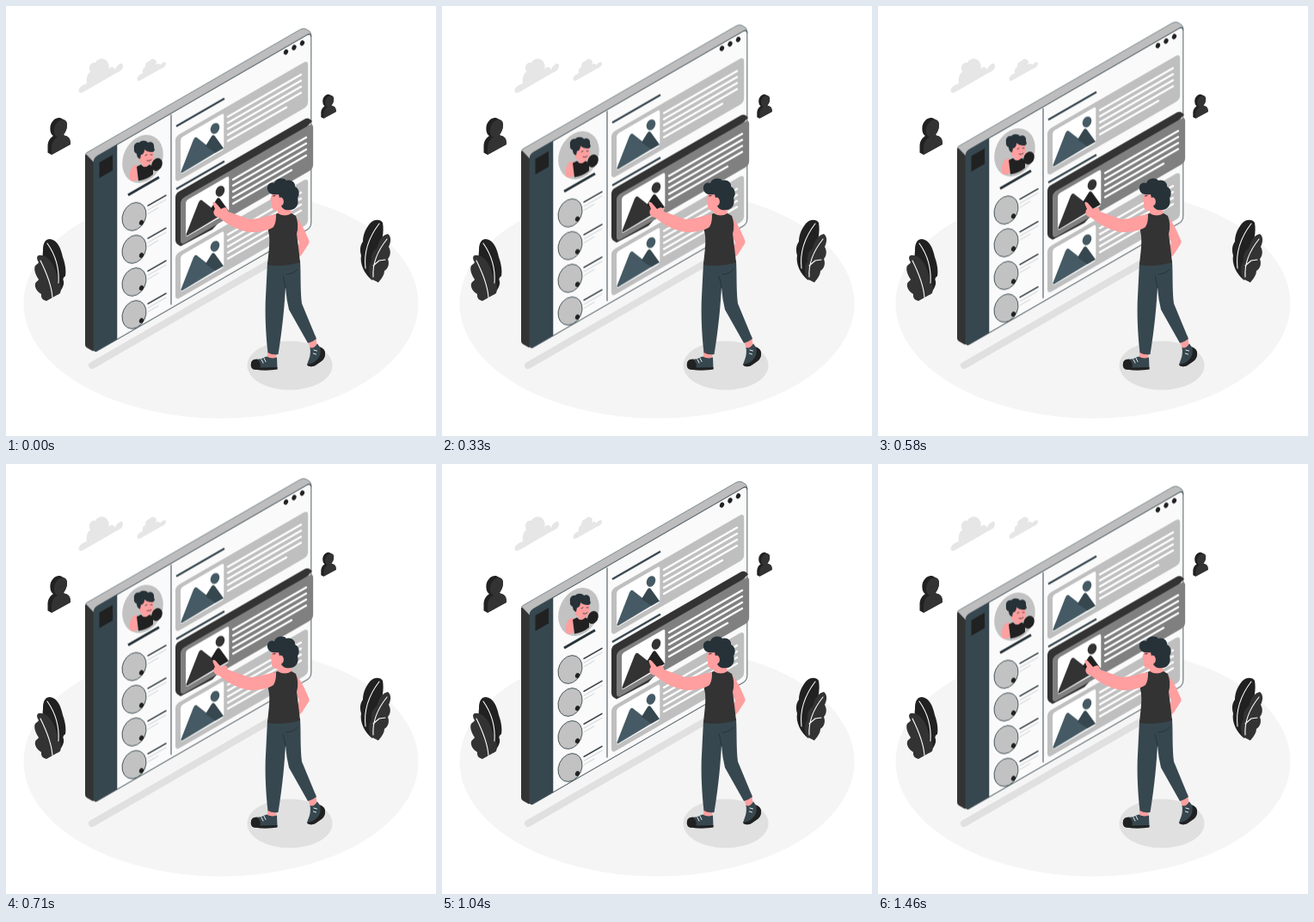
Recreate the animation shown at these times as an HTML page. Size 500 by 500 pixels, loop 1.5 s.

```html
<!DOCTYPE html>
<html lang="en">
<head>
<meta charset="utf-8">
<title>Dashboard</title>
<style>
  html, body { margin: 0; width: 100%; height: 100%; overflow: hidden; background: #fff; }
  svg { display: block; width: 100vw; height: 100vh; }
  #screen { animation: float 1.5s linear infinite; }
  @keyframes float { 50% { transform: translateY(-10px); } }
  .card { color: #bfbfbf; --ink: #455a64; --shade: #37474f; }
  .card.active { color: #808080; --ink: #333; --shade: #212121; }
  .ink { fill: var(--ink); }
  .shade { fill: var(--shade); }
  .line { fill: none; stroke-linecap: round; stroke-linejoin: round; }
  .slate { fill: #37474f; }
  .navy { fill: #263238; }
  .black { fill: #212121; }
  .side { fill: #333; }
  .skin { fill: #ff9f9f; }
</style>
</head>
<body>
<svg viewBox="0 0 500 500">
  <defs>
    <g id="card">
      <rect width="178" height="53.500" rx="5" fill="currentColor" transform="matrix(.866 -.5 0 1 197 152)"/>
      <rect x="7" y="5" width="58" height="42.500" rx="3" fill="#fff" transform="matrix(.866 -.5 0 1 197 152)"/>
      <path class="ink" d="M203.500 192.500L217.800 156Q220 150.500 223 154L244 170.500 205 194Q203 195 203.500 192.500Z"/>
      <path class="shade" d="M232 163L238.500 152.500Q241 148.500 243.300 152L253 165.500 243.500 171Z"/>
      <ellipse class="ink" cx="243" cy="142.500" rx="5" ry="6.500" transform="rotate(25 243 142.500)"/>
      <path class="line" stroke="#fff" stroke-width="2.400" d="M258 129l85-49M258 136l85-49M258 143l85-49M258 150l85-49M258 157l68-39"/>
    </g>
    <g id="row">
      <ellipse cx="149" cy="245" rx="13.300" ry="17" fill="#c2c2c2" stroke="#37474f" stroke-width=".8" transform="rotate(25 149 245)"/>
      <ellipse cx="157.500" cy="252" rx="2.500" ry="3.100" class="black" transform="rotate(25 157.500 252)"/>
      <path class="line" stroke="#263238" stroke-width="1.400" d="M165 232.300l21-12"/>
      <path class="line" stroke="#cfd3d6" stroke-width="1" d="M165 237.300l21-12M165 241.800l12-7"/>
    </g>
    <g id="user">
      <path class="black" d="M51.500 140C53 133 59 128.500 64 130.500L69 133C72 135 71.500 142 69 146L67 150 73 153Q75 155 75 161L53 173 48.500 170.500V162C49 156 52 153 55 151 52 149 51 145 51.500 140Z"/>
      <path class="side" d="M56 143C57 136 63 131 67.500 132.500 72 134.500 71.500 142 69 146.500 67.500 149 66.500 150 66 150.500 71 150 75 153 75 160.500L53 173V165C53.500 158 56.500 154 60 152.500 57 151.500 55.500 148 56 143Z"/>
    </g>
  </defs>

  <ellipse cx="250" cy="346" rx="229.500" ry="133.500" fill="#f5f5f5"/>
  <path class="line" stroke="#e0e0e0" stroke-width="8" d="M100 418l230-132.800"/>
  <ellipse cx="330" cy="418" rx="49.500" ry="28.500" fill="#e0e0e0"/>

  <g fill="#e6e6e6">
    <path d="M85 100C83 97 87 92 94 90 93 84 95 78 98 77 95 70 99 65 104 66 107 60 115 60 118 65 120 68 120 71 119 74 122 69 127 71 126 75 130 67 135 65 136 69 136 74 133 76 128 78L90 100Q86 102 85 100Z"/>
    <path d="M153 86C151 83 155 80 159 78 158 74 160 72 162 71 162 66 165 64 167 64 169 60 174 61 175 65L174 69C176 66 179 67 179 69 182 65 186 64 186 67 186 70 183 72 180 73L157 86Q154 88 153 86Z"/>
  </g>
  <use href="#user"/>
  <use href="#user" transform="translate(334.300 18.300) scale(.66 .65)"/>

  <g class="black">
    <path d="M58 334C46 322 41 300 43 284 43 275 46 271 51 271 60 272 64 282 66 292 69 300 70 308 69 314 66 316 66 318 67 320 68 325 64 331 60 336Z"/>
    <path class="side" d="M47 343C41 341 41 339 41 335 36 332 33 327 34 323 35 320 37 320 38 318 34 312 32 306 34 302 36 300 37 300 38 298 36 295 35 291 38 290 44 289 50 293 54 300 57 306 59 312 60 316L59 320C64 322 65 327 63 334Z"/>
    <path d="M426 319C417 312 411 300 413 290 411 283 412 278 415 274 415 265 419 258 423 253 427 248 435 247 438 252 440 262 437 275 434 285Z"/>
    <path class="side" d="M433 321.500 424 317C421 309 421 302 425 297 424 290 427 284 431 282 433 273 438 266 444 265 448 268 448 274 445 280 448 285 447 291 444 294 446 299 445 305 440 308 440 313 436 318 433 321.500Z"/>
  </g>
  <path class="line" stroke="#fff" stroke-width="1.100" d="M48 276C58 290 62 306 61 322M40 296C47 310 53 324 54 339M434 253C421 270 416 288 418 305M443 271C431 286 426 300 427 315M427 302l7-6 7-1"/>

  <g id="screen">
    <path class="side" d="M92 173V394Q92 396.500 94 397.500L101 401.500 110 396V174Z"/>
    <path d="M92.500 172Q93 171 95 170L342 27.500Q346 25.500 349 27L353 29.500Q355 31 355 36L102 182Z" fill="#bdbdbd" stroke="#455a64" stroke-width=".6"/>
    <g transform="matrix(.866 -.5 0 1 102 177)">
      <rect width="292" height="226.500" rx="5" fill="#fafafa" stroke="#37474f" stroke-width="1"/>
      <path class="slate" d="M31.500 0H4Q0 0 0 4V221Q0 226.500 5 226.500H31.500Z"/>
      <rect x="7.500" y="9" width="18" height="18" class="black"/>
    </g>
    <path class="line" stroke="#707980" stroke-width="1.400" d="M192 127V347"/>
    <g class="black">
      <ellipse cx="325.500" cy="53.700" rx="2.500" ry="3.200" transform="rotate(25 325.500 53.700)"/>
      <ellipse cx="335" cy="48.500" rx="2.500" ry="3.200" transform="rotate(25 335 48.500)"/>
      <ellipse cx="344.500" cy="43.300" rx="2.500" ry="3.200" transform="rotate(25 344.500 43.300)"/>
    </g>

    <ellipse cx="159" cy="178" rx="22.500" ry="29" fill="#c2c2c2" transform="rotate(25 159 178)"/>
    <path class="skin" d="M154 168 155 181Q157 183 159 183.500L158 188 166 187 166 183.500C171 184 172 178 171.500 169L165 165ZM144.500 203C142.500 193 146 184 153 185L155 201Q149 205 144.500 203Z"/>
    <path class="black" d="M152 187 157 184.500Q161 190 167 184.500L171 187V196Q164 202 154 203.500Z"/>
    <path class="navy" d="M149 166C148 161 152 158 155 159 157 156 163 156 165 159 169 157 173 160 172 165 174 168 172 170 169 170 166 170 163 169 161 167 161 171 159 173 157 173L156 178Q152 177 152 172 148 170 149 166Z"/>
    <path class="line" stroke="#263238" stroke-width=".8" d="M162 174l2-1M168 173l2 0M164 180q3 1 5-1"/>
    <ellipse cx="175.500" cy="184.500" rx="6" ry="7.700" class="black" transform="rotate(25 175.500 184.500)"/>
    <path stroke="#263238" stroke-width="3" d="M142 220l36-20.700"/>

    <use href="#row"/>
    <use href="#row" y="38"/>
    <use href="#row" y="76"/>
    <use href="#row" y="114"/>

    <path stroke="#37474f" stroke-width="2.300" d="M198 140l56-32.300M198 213l56-32.300"/>
    <use class="card" href="#card"/>
    <use class="card" href="#card" y="137"/>
    <path class="side" d="M197 223Q197 218.300 201 216L348 131.200Q351 130 353 131.500L356 134 240 260 203 279.500 199 277Q197 275.500 197 272.500Z"/>
    <use class="card active" href="#card" x="6" y="73"/>
  </g>

  <g id="person">
    <path class="skin" d="M336 245C342 249 347 260 352 272Q353.500 275 351 278L344 289Q341 293 337 291L338 285 341 275 335 263Z"/>
    <path class="skin" d="M304 390V412H314L315 390ZM350 386 354 399 362 397 360 383Z"/>
    <path class="slate" d="M285 415C286 411 292 410.500 296 410.500L303 407.500Q309 411 315 408.500L315.500 422Q303 424.500 288 422.500 284 421 285 415ZM353.500 397Q358 399 362 392.500C365 398 370 399 371 403 372 410 367 413 361 417 357 420 352 420 350 417 352 411 355 406 353.500 397Z"/>
    <path class="black" d="M285 415C286 411 289 410.500 292 410.700Q297 415 295.500 420.500L315.500 420V422.500Q303 424.500 288 422.500 284 421 285 415ZM365 396.500C369 398 371 400 371 404 371 411 367 413 361 417 357 420 352 420 350 417L357 415C365 410 367 404 365 396.500Z"/>
    <path class="line" stroke="#fff" stroke-width=".9" d="M297 411l2 4M300 409.500l2 4M358 400l3.500 1M357.500 404l3 1"/>
    <path class="slate" d="M304 298 342 296C343 312 342 330 344 346L361 387Q356 391 351 392L329 353Q326 341 325 327C324 345 322 372 316.500 405Q309 406 304.500 403C302 382 301 356 302 338Z"/>
    <path class="line" stroke="#263238" stroke-width=".9" d="M325 328Q324 320 322 314M326 312Q334 312 339 306"/>
    <path class="skin" d="M310 216 307.500 224Q307 227 309 228V234Q311 239 316 238V244Q324 251 332 243L330 222 317 214Z"/>
    <path class="side" d="M308 244 316 241Q324 246 332 241L337 244Q341 254 338 265C340 279 341 289 342 298Q322 304 304 301C305 289 307 278 306 267L304 256Z"/>
    <path class="skin" d="M314 242C303 244 293 248 283 248L258 239C258 235 255 233 252 235L250 236 244 229Q240 226 240.500 230L243 236C240 239 241 245 248 246 257 254 272 262 284 263 295 263 305 261 311 257 314 252 314 247 314 242Z"/>
    <path class="navy" d="M304 213C303 207 308 204 312 206 314 200 323 199 326 203 332 201 337 206 336 210 341 212 342 219 339 223 341 230 338 236 331 237 325 238 321 236 320 232L317 219C311 220 305 219 304 213Z"/>
    <ellipse class="skin" cx="319.500" cy="227.500" rx="3.400" ry="5"/>
    <path class="line" stroke="#263238" stroke-width="1" d="M310.500 221l2.500-.5"/>
  </g>
</svg>
</body>
</html>
```
